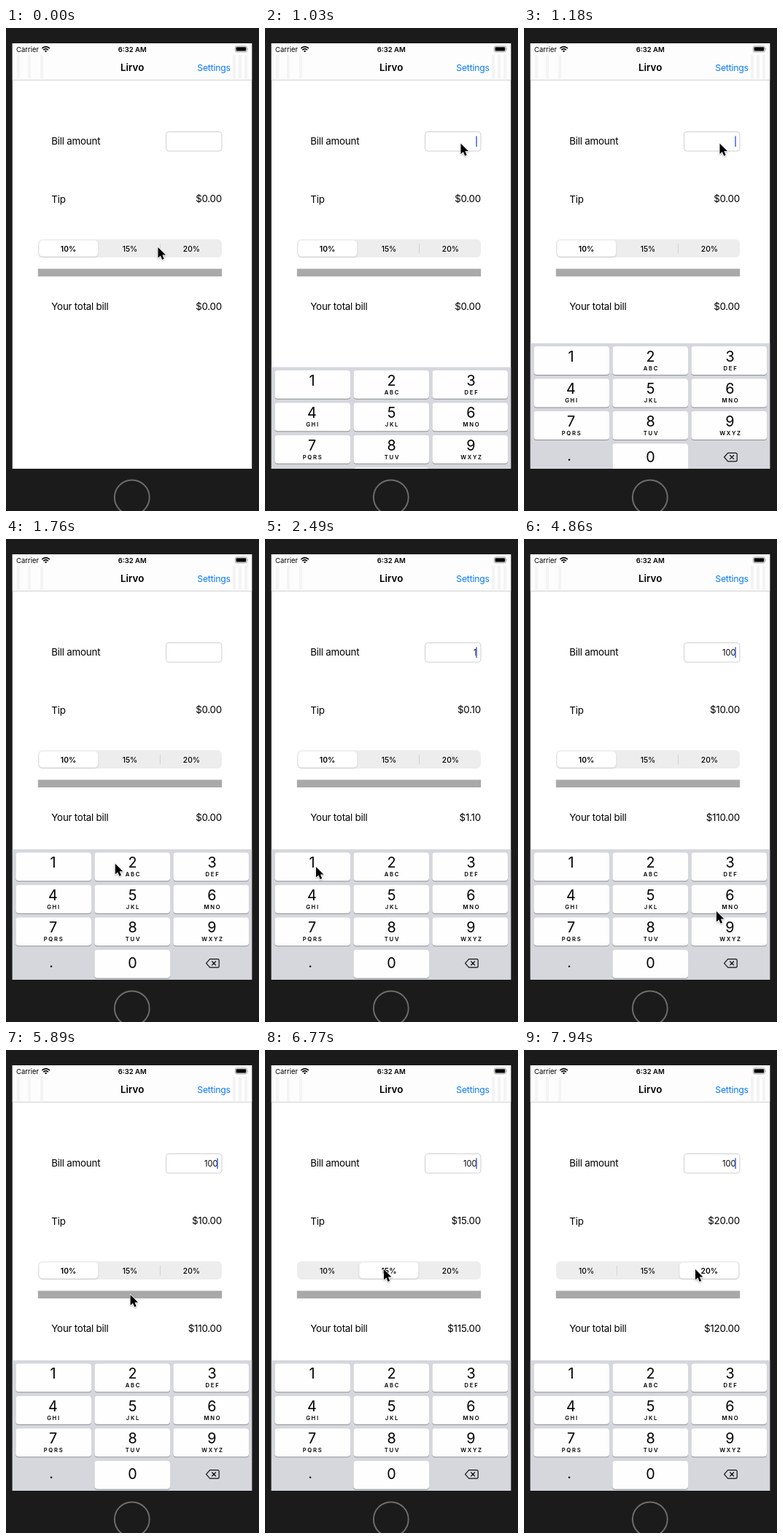
Animation of 347x663 px, one loop 8 s. Source, as an HTML page:

```html
<!DOCTYPE html>
<html lang="en">
<head>
<meta charset="utf-8">
<title>Tip calculator</title>
<style>
  html, body { margin: 0; width: 100%; height: 100%; overflow: hidden; background: #1b1b1b; }
  svg { display: block; width: 347px; height: 663px; }
  text { font-family: Inter, Roboto, sans-serif; fill: #000; white-space: pre; }
  .label { font-size: 13.4px; letter-spacing: -.25px; }
  .status { font-size: 9.5px; }
  .title { font-size: 13.4px; font-weight: 600; }
  .link { font-size: 12.3px; letter-spacing: -.25px; fill: #0a7aff; }
  .segment { font-size: 10.3px; font-weight: 500; }
  .segment.on { font-weight: 600; }
  .entry { font-size: 11.1px; }
  .digit { font-size: 19.8px; }
  .letters { font-size: 7.7px; font-weight: 600; letter-spacing: 1.7px; }
  .mid { text-anchor: middle; }
  .end { text-anchor: end; }
</style>
</head>
<body>
<svg viewBox="0 0 347 663">
  <defs>
    <clipPath id="screen"><rect x="8.8" y="21" width="328.4" height="584"/></clipPath>
    <filter id="soft" x="-10%" y="-30%" width="120%" height="170%">
      <feDropShadow dx="0" dy="1" stdDeviation="1.2" flood-opacity=".2"/>
    </filter>
    <filter id="shade" x="-50%" y="-30%" width="200%" height="170%">
      <feDropShadow dx="0" dy="1" stdDeviation=".9" flood-opacity=".35"/>
    </filter>
  </defs>
  <rect width="347" height="663" fill="#1b1b1b"/>
  <circle cx="172.8" cy="644.3" r="23.9" fill="none" stroke="#6c6c6c" stroke-width="2"/>

  <g clip-path="url(#screen)">
    <rect x="8" y="21" width="330" height="584" fill="#fff"/>
    <rect x="8" y="21" width="330" height="50" fill="#fdfdfd"/>
    <path d="M17 37V70M32 37V70M49 37V70M313 37V70M321 37V70M329 37V70" stroke="#f4f4f4" stroke-width="4"/>
    <path d="M8 71.5H338" stroke="#d2d2d2"/>

    <text class="status" x="14" y="32.5">Carrier</text>
    <path d="M49.3 27.9Q54.6 23.2 59.9 27.9M51.3 30.1Q54.6 27.2 57.9 30.1"
          fill="none" stroke="#000" stroke-width="1.7"/>
    <path d="M52.9 31.4Q54.6 30 56.3 31.4L54.6 33.2Z"/>
    <text class="status mid" x="173.2" y="32.5" font-weight="600">6:32 AM</text>
    <rect x="314.4" y="25" width="16" height="7.8" rx="2" fill="none" stroke="#888" stroke-width=".8"/>
    <rect x="315.6" y="26.2" width="13.6" height="5.4" rx="1"/>
    <path d="M331.6 27.6Q333 28.9 331.6 30.2Z" fill="#888"/>

    <text class="title mid" x="173.2" y="59.4">Lirvo</text>
    <text class="link mid" x="285" y="59.2">Settings</text>

    <text class="label" x="62.3" y="159.6">Bill amount</text>
    <text class="label" x="62.3" y="239.6">Tip</text>
    <text class="label" x="62.3" y="387.4">Your total bill</text>
    <text class="label end" id="tip" x="296" y="239.2"></text>
    <text class="label end" id="total" x="296" y="387.4"></text>

    <rect x="219.5" y="142.5" width="76.5" height="26.5" rx="3.8" fill="#fff" stroke="#cfcfcf"/>
    <text class="entry end" id="entry" x="290.4" y="159.5"></text>
    <rect id="caret" x="289.3" y="148.4" width="1.5" height="14.6" fill="#4467dc"/>

    <rect x="44" y="290" width="252" height="25" rx="6" fill="#ededee"/>
    <path id="divider0" d="M127.5 296V309.5" stroke="#d4d4d7"/>
    <path id="divider1" d="M211.5 296V309.5" stroke="#d4d4d7"/>
    <rect id="pill" y="291.6" width="80.6" height="22" rx="5" fill="#fff" filter="url(#soft)"/>
    <g id="segments"></g>
    <rect x="43.8" y="330.5" width="252.4" height="10.5" fill="#a9a9a9"/>

    <g id="keyboard">
      <rect x="8" y="426" width="330" height="180" fill="#d5d7dd"/>
      <text class="digit mid" x="62.2" y="587.6">.</text>
      <path d="M279.6 576.6H290.3Q292.2 576.6 292.2 578.5V586.2Q292.2 588.1 290.3 588.1H279.6L274.6 582.3Z
               M282.3 579.5L288 585.2M288 579.5L282.3 585.2"
            fill="none" stroke="#111" stroke-width="1.2" stroke-linejoin="round"/>
    </g>
  </g>

  <path id="cursor" d="M0 0V14.6L3.4 11.5 5.7 16.9 8.2 15.8 5.9 10.6H10.5Z" filter="url(#shade)"
        stroke="#fff" stroke-width="1.4" stroke-linejoin="round" paint-order="stroke"/>
</svg>
<script>
const LOOP = 8000;
const BEAT = 147.1; // the screen refreshes once per beat
const $ = id => document.getElementById(id);
const clamp = v => Math.min(1, Math.max(0, v));
const ease = v => clamp(v) ** 2 * (3 - 2 * clamp(v));

function add(parent, tag, attrs, text = '') {
  const node = document.createElementNS('http://www.w3.org/2000/svg', tag);
  for (const name in attrs) node.setAttribute(name, attrs[name]);
  node.textContent = text;
  parent.append(node);
  return node;
}

const labels = ['10%', '15%', '20%'].map((text, i) =>
  add($('segments'), 'text', { x: 85.6 + i * 84.4, y: 306.7 }, text));

const keys = {};
function addKey(digit, col, row, sub) {
  const box = { x: 13.4 + col * 108, width: 103.6, height: 38.8, rx: 4 };
  const y = 430.4 + row * 44.5;
  const middle = 64.5 + col * 109;
  add($('keyboard'), 'rect', { ...box, y: y + 1, fill: '#8c8e93' });
  keys[digit] = add($('keyboard'), 'rect', { ...box, y });
  add($('keyboard'), 'text', { class: 'digit mid', x: middle, y: y + (digit ? 20.8 : 25.1) }, digit);
  add($('keyboard'), 'text', { class: 'letters mid', x: middle + 1, y: y + 32.6 }, sub);
}
['', 'ABC', 'DEF', 'GHI', 'JKL', 'MNO', 'PQRS', 'TUV', 'WXYZ'].forEach((sub, i) =>
  addKey(i + 1, i % 3, Math.floor(i / 3), sub));
addKey(0, 1, 3, '');

// Eased pointer moves in beats; an optional control point bends the path.
const home = [208.5, 301];
const moves = [
  { from: 0, until: 4, to: [268.5, 158.5] },
  { from: 8, until: 14, to: [70, 450], via: [243, 490] },
  { from: 17, until: 22, to: [165, 579], via: [120, 630] },
  { from: 27, until: 29, to: [193, 570] },
  { from: 30, until: 35, to: [275, 487], via: [273, 517] },
  { from: 35, until: 42, to: [163, 301], via: [173, 388] },
  { from: 47, until: 49, to: [193, 301] },
  { from: 50, until: 52, to: [235, 301] }
];

function pointerAt(beat) {
  let at = home;
  for (const { from, until, to, via } of moves) {
    if (beat < from) break;
    const k = ease((beat - from) / (until - from));
    at = at.map((a, i) => {
      const bend = via ? via[i] : (a + to[i]) / 2;
      return a * (1 - k) ** 2 + 2 * bend * k * (1 - k) + to[i] * k * k;
    });
  }
  return at;
}

const edits = [
  { beat: 7, text: '' },
  { beat: 15, text: '1', key: 1 },
  { beat: 23, text: '10', key: 0 },
  { beat: 24, text: '100' }
];
const KEYBOARD_OPENS = edits[0].beat;
const PICKS = [43, 52];

// The caret blinks once a second, restarting at every edit.
function caretAlpha(beat, edit) {
  const seconds = (beat - edit.beat) * BEAT / 1000;
  return clamp((.62 - seconds % 1) / .08);
}

const money = value => '$' + value.toFixed(2);

function draw(time) {
  const beat = Math.floor((time % LOOP + 20) / BEAT);
  const edit = edits.findLast(e => e.beat <= beat);

  $('cursor').setAttribute('transform', `translate(${pointerAt(beat)})`);
  $('caret').setAttribute('opacity', edit ? caretAlpha(beat, edit) : 0);
  const drop = edit ? 39.5 * .17 ** (beat - KEYBOARD_OPENS) : 200;
  $('keyboard').setAttribute('transform', `translate(0 ${drop})`);

  const slide = PICKS.reduce((sum, pick) => sum + ease((beat - pick) / 2), 0);
  const choice = Math.round(slide);
  $('pill').setAttribute('x', 45.5 + slide * 84);
  labels.forEach((label, i) =>
    label.setAttribute('class', 'segment mid' + (i === choice ? ' on' : '')));
  $('divider0').setAttribute('opacity', choice === 2 ? 1 : 0);
  $('divider1').setAttribute('opacity', choice === 0 ? 1 : 0);

  const typed = edit ? edit.text : '';
  const bill = Number(typed);
  const tip = bill * (10 + 5 * choice) / 100;
  $('entry').textContent = typed;
  $('tip').textContent = money(tip);
  $('total').textContent = money(bill + tip);

  const pressed = edit && edit.beat === beat ? edit.key : undefined;
  for (const digit in keys)
    keys[digit].setAttribute('fill', Number(digit) === pressed ? '#bdc6d2' : '#fefefe');
}

const start = performance.now();
function tick() {
  draw(performance.now() - start);
  requestAnimationFrame(tick);
}
tick();
</script>
</body>
</html>
```
